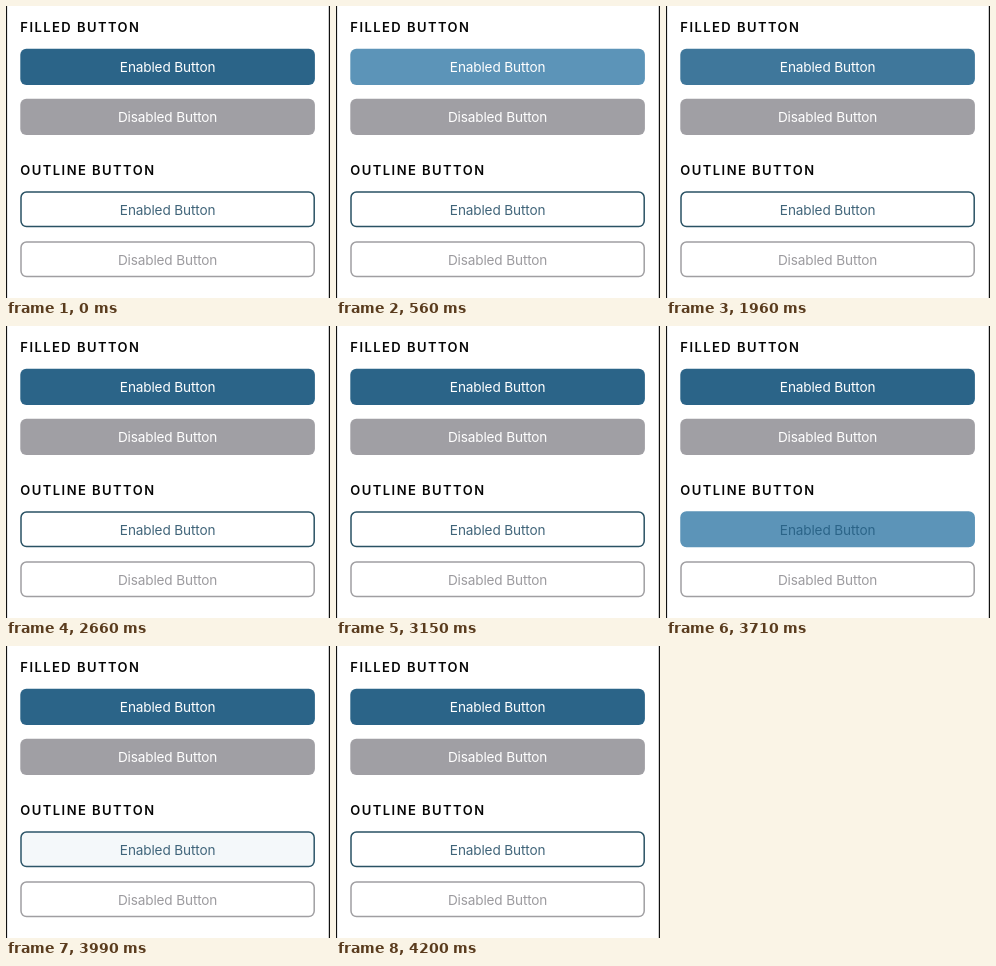
An HTML page that plays this animation: 324x292 px, repeating every 4.34 s.

```html
<!DOCTYPE html>
<html lang="en">
<head>
<meta charset="utf-8">
<title>Button states</title>
<style>
  html, body { margin: 0; width: 100%; height: 100%; overflow: hidden; background: #fff; }
  svg { display: block; width: 324px; height: 292px; }
  text { font: 400 13.6px Inter, Roboto, sans-serif; letter-spacing: -.14px; }
  .label { text-anchor: middle; }
  .heading { font-size: 13px; font-weight: 600; letter-spacing: 1.45px; fill: #050505; }
  .line { stroke-width: 1.5px; }
</style>
</head>
<body>
<svg viewBox="0 0 324 292">
  <rect width="324" height="292" fill="#fff"/>
  <path d="M.5 0V292M323.4 0V292" stroke="#111" stroke-width="1.2"/>

  <text class="heading" x="14.3" y="26">FILLED BUTTON</text>
  <rect id="filled" x="14.3" y="42.8" width="294.6" height="36.1" rx="6"/>
  <text class="label" x="161.6" y="66" fill="#fff">Enabled Button</text>
  <rect x="14.3" y="92.8" width="294.6" height="36.1" rx="6" fill="#a09fa4"/>
  <text class="label" x="161.6" y="116" fill="#fff">Disabled Button</text>

  <text class="heading" x="14.3" y="168.5">OUTLINE BUTTON</text>
  <rect id="outline" class="line" x="15" y="186" width="293.2" height="34.6" rx="5.5"/>
  <text id="caption" class="label" x="161.6" y="208.7">Enabled Button</text>
  <rect class="line" x="15" y="236" width="293.2" height="34.6" rx="5.5" fill="#fff" stroke="#a09fa2"/>
  <text class="label" x="161.6" y="258.5" fill="#9c9b9f">Disabled Button</text>
</svg>
<script>
const LOOP = 4340, STEP = 70, FADE_IN = 210, FADE_OUT = 350;
const DARK = '#2b6488', LIGHT = '#5c94b8';
const $ = id => document.getElementById(id);
const clamp = x => Math.min(1, Math.max(0, x));
const mix = (from, to, k) => `color-mix(in srgb, ${to} ${k * 100}%, ${from})`;

// 0 at rest, 1 while held between down and up
const press = (t, down, up) => clamp((t - down) / FADE_IN) - clamp((t - up) / FADE_OUT);

function draw(now) {
  const t = Math.floor(now % LOOP / STEP) * STEP;
  const tint = press(t, 3500, 3710) ** 1.7;
  $('filled').style.fill = mix(DARK, LIGHT, press(t, 0, 1750));
  $('outline').style.fill = mix('#fff', LIGHT, tint);
  $('outline').style.stroke = mix('#2a5264', LIGHT, tint);
  $('caption').style.fill = mix('#41657a', DARK, tint);
}

const start = performance.now();
function tick() {
  draw(performance.now() - start);
  requestAnimationFrame(tick);
}
tick();
</script>
</body>
</html>
```
